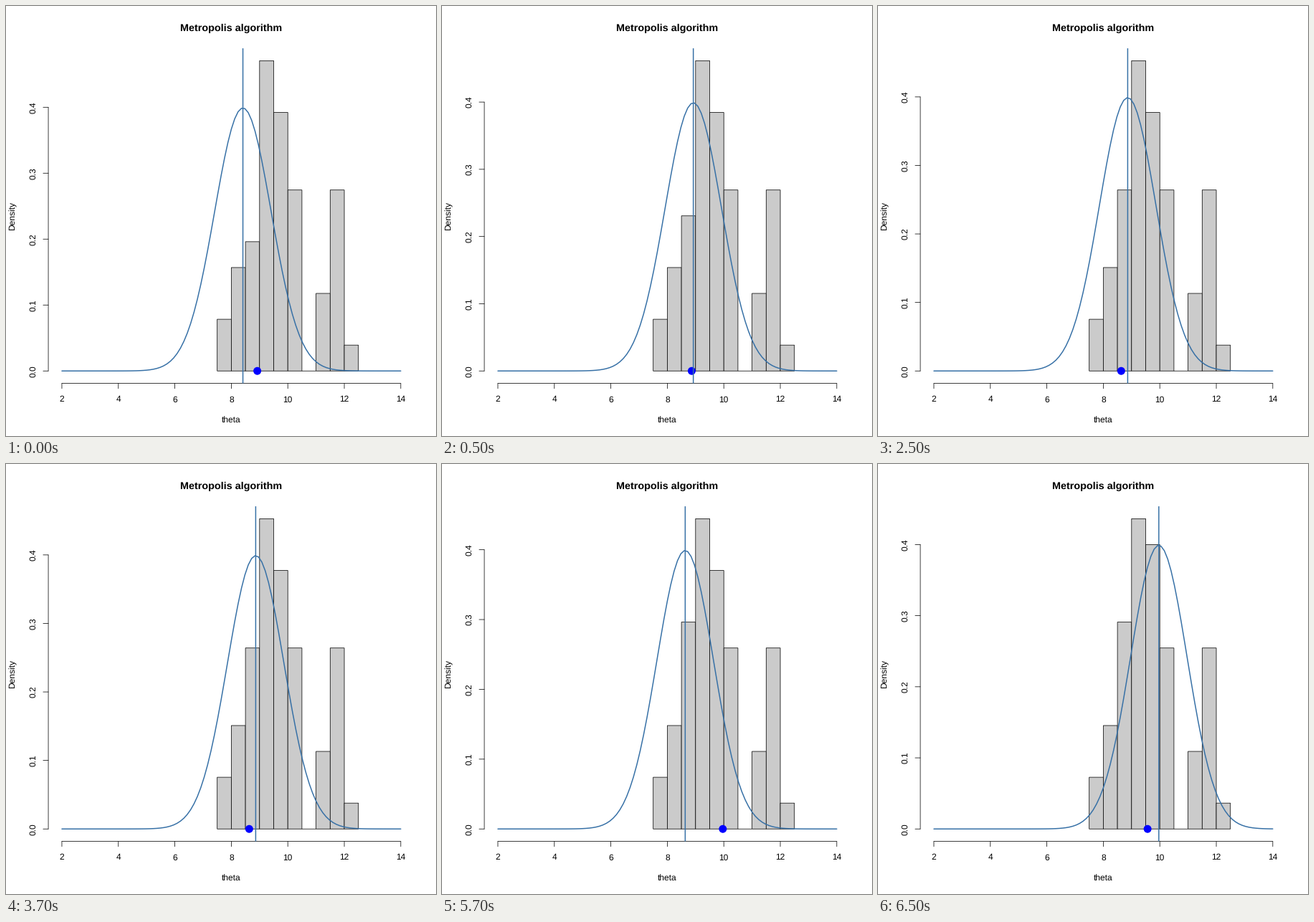
A matplotlib script that plays this animation: 600 by 600 pixels, repeating every 8 s.

```python
import numpy as np
import matplotlib.pyplot as plt
from matplotlib.animation import FuncAnimation
from matplotlib.patches import Circle, Rectangle

plt.rcParams.update({
    "font.family": "Liberation Sans",
    "text.hinting": "none",
    "lines.solid_capstyle": "round",
    "lines.solid_joinstyle": "round",
})

SIZE, DPI = 600, 72          # at 72 dpi one point is one pixel
LINE = 14.4                  # height of one margin line
LEFT, RIGHT = 4.1 * LINE, SIZE - 2.1 * LINE
TOP, BOTTOM = 4.1 * LINE, SIZE - 5.1 * LINE
X_UNIT = (RIGHT - LEFT) / 1.08 / 12
Y_SPAN = (BOTTOM - TOP) / 1.08
BASE = BOTTOM - 0.04 * Y_SPAN
THIN, THICK = 0.75, 1.5
BLUE, GREY = "#3670a6", "#cbcbcb"

BIN_START, BIN_WIDTH = 7.5, 0.5
START_COUNTS = np.array([2, 4, 5, 12, 10, 7, 0, 3, 7, 1])
CHAIN = [8.41, 8.92, 8.863, 8.633, 9.965, 9.567]
GRID = np.linspace(2, 14, 101)

fig = plt.figure(figsize=(SIZE / DPI, SIZE / DPI), dpi=DPI, facecolor="white")
ax = fig.add_axes([0, 0, 1, 1])


def px(theta):
    return LEFT + (theta - 2 + 0.48) * X_UNIT


def line(xs, ys, color="black", width=THIN, **style):
    ax.plot(xs, ys, color=color, lw=width, snap=False, **style)


def label(x, y, text, size=12, **style):
    ax.text(x, y, text, size=size, ha="center", va="baseline",
            rotation_mode="anchor", **style)


def draw_axes(py):
    line([px(2), px(14)], [BOTTOM, BOTTOM])
    for value in range(2, 15, 2):
        line([px(value)] * 2, [BOTTOM, BOTTOM + LINE / 2])
        label(px(value), BOTTOM + 1.8 * LINE, str(value))

    line([LEFT, LEFT], [py(0), py(0.4)])
    for value in np.arange(5) / 10:
        line([LEFT, LEFT - LINE / 2], [py(value)] * 2)
        label(LEFT - 1.2 * LINE, py(value), f"{value:.1f}", rotation=90)

    middle = (LEFT + RIGHT) / 2
    label(middle, TOP / 2 + 5.2, "Metropolis algorithm", LINE, weight="bold")
    label(middle, BOTTOM + 3.8 * LINE, "theta")
    label(LEFT - 3.2 * LINE, (TOP + BOTTOM) / 2, "Density", rotation=90)


def draw(frame):
    step = (frame + 3) // 4
    current, proposal = CHAIN[step], CHAIN[step + 1]

    counts = START_COUNTS.copy()
    for sample in CHAIN[1:step + 1]:
        counts[int((sample - BIN_START) / BIN_WIDTH)] += 1
    density = counts / counts.sum() / BIN_WIDTH

    def py(value):
        return BASE - value / density.max() * Y_SPAN

    ax.clear()
    ax.set(xlim=(0, SIZE), ylim=(SIZE, 0))
    ax.axis("off")
    draw_axes(py)

    for i, height in enumerate(density):
        x = px(BIN_START + i * BIN_WIDTH)
        ax.add_patch(Rectangle((x, BASE), BIN_WIDTH * X_UNIT, py(height) - BASE,
                               fc=GREY, ec="black", lw=THIN, snap=False))

    ax.add_patch(Circle((px(proposal), BASE), 5.5, fc="#0000ff", lw=0, zorder=3))
    bell = np.exp(-(GRID - current) ** 2 / 2) / np.sqrt(2 * np.pi)
    line(px(GRID), py(bell), BLUE, THICK, zorder=4)
    line([px(current)] * 2, [TOP, BOTTOM], BLUE, THICK, zorder=4,
         solid_capstyle="butt")
    return []


anim = FuncAnimation(fig, draw, frames=16, interval=500, repeat=True,
                     repeat_delay=0, init_func=lambda: [])
plt.show()
```
